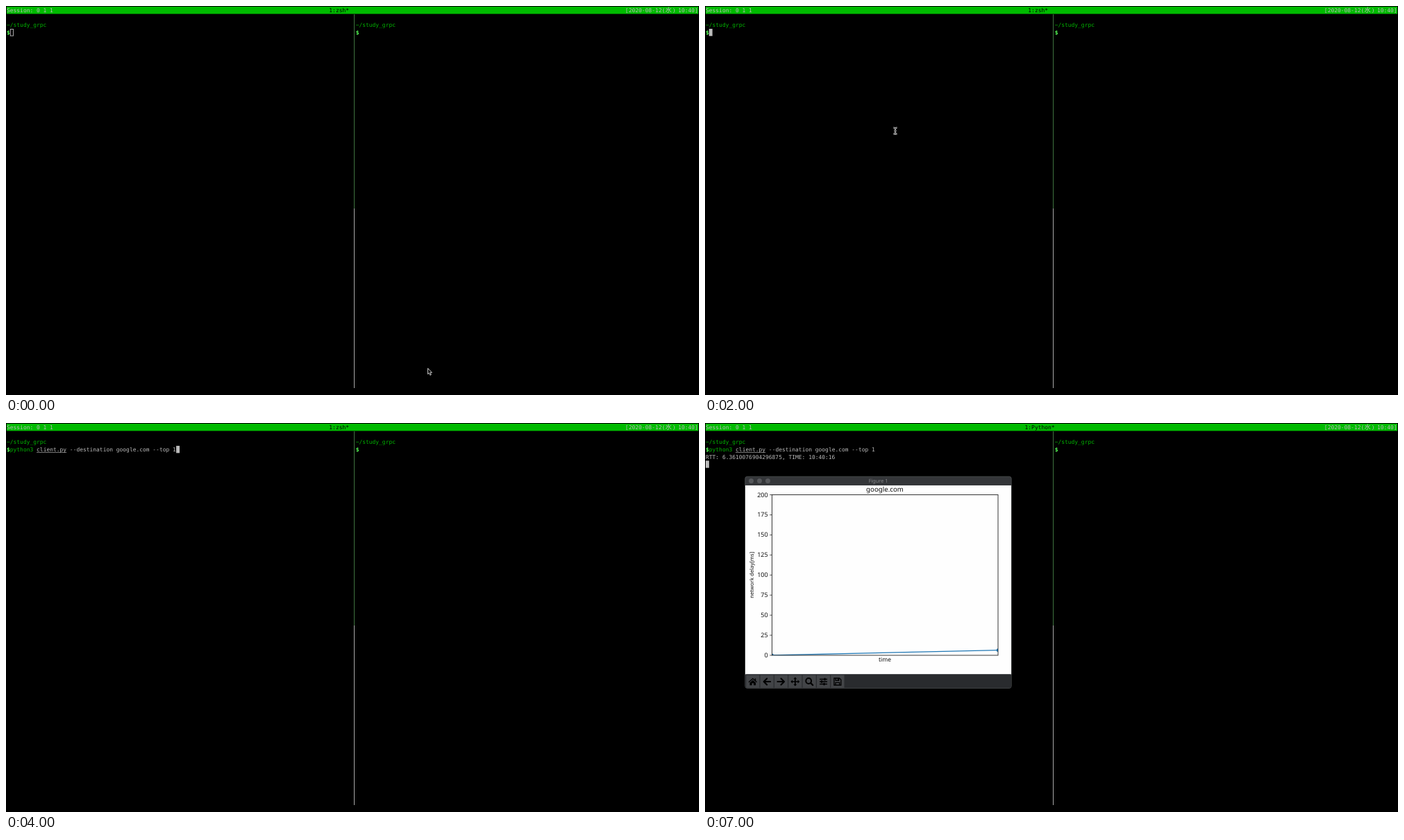
Animation of 998x561 px, one loop 8000 ms. Source, as an HTML page:

```html
<!DOCTYPE html>
<html lang="en">
<head>
<meta charset="utf-8">
<title>Terminal session</title>
<style>
  html, body { margin: 0; width: 100%; height: 100%; overflow: hidden; background: #000; }
  svg { display: block; width: 998px; height: 561px; }
  text { white-space: pre; text-rendering: geometricPrecision; }
  .term { font: 7.95px "DejaVu Sans Mono", monospace; fill: #bbb; }
  .term .green { fill: #00b400; }
  .term .prompt { fill: #5f5; font-weight: bold; }
  .term .hint { fill: #5c5c5c; }
  .term .dark { fill: #000; }
  .plot { font-family: "Noto Sans", "Open Sans", sans-serif; fill: #111; }
</style>
</head>
<body>
<svg id="stage" viewBox="0 0 998 561"></svg>
<script>
const CELL = 4.787, ROW = 10.7, LOOP = 8000;
const stage = document.getElementById('stage');

const colX = c => 1 + c * CELL;
const rowY = r => 6 + r * ROW;
const rect = (x, y, w, h, fill, more = '') =>
  `<rect x="${x}" y="${y}" width="${w}" height="${h}" fill="${fill}" ${more}/>`;
const path = (d, stroke, width, more = '') =>
  `<path d="${d}" fill="none" stroke="${stroke}" stroke-width="${width}" ${more}/>`;
const text = (col, row, s, cls = '') =>
  `<text class="${cls}" x="${colX(col)}" y="${rowY(row) + 2.7}">${s}</text>`;
const label = (x, y, size, s, more = '') =>
  `<text x="${x}" y="${y}" font-size="${size}" ${more}>${s}</text>`;

const block = (col, row) => rect(colX(col), rowY(row) - 5.2, 4.9, 10.4, '#bbb');
const hollow = (col, row) =>
  rect(colX(col) + .5, rowY(row) - 4.7, 4.2, 9.6, 'none', 'stroke="#bbb" stroke-width=".9"');

const arrow = (x, y) =>
  `<path d="M${x} ${y}v8.4l1.9-1.7 1.4 3.2 1.5-.7-1.4-3h2.5z" fill="#000" stroke="#ddd" stroke-width=".9"/>`;
function beam(x, y) {
  const d = `M${x - 2.6} ${y - 4.5}q2.6 0 2.6 1.5q0-1.5 2.6-1.5M${x} ${y - 3.5}v7` +
            `M${x - 2.6} ${y + 4.5}q2.6 0 2.6-1.5q0 1.5 2.6 1.5M${x - 1.5} ${y}h3`;
  return path(d, '#ddd', 2.2) + path(d, '#222', .7);
}

const args = ' --destination google.com --top 1';
const typing = text(1, 3, 'python', 'green') + block(7, 3) + text(7, 3, '3', 'dark') +
  text(8, 3, ' client.py' + args, 'hint');
const command = text(1, 3, 'python3', 'green') + text(9, 3, 'client.py' + args) +
  path(`M${colX(9)} 42.5h${9 * CELL}`, '#999', .8);

function base(title, col) {
  return rect(1, 1, 996, 10.4, '#00bb00') +
    text(0, 0, 'Session: 0 1 1') + text(col, 0, title, 'dark') +
    text(186.1, 0, '[2020-08-12(') +
    `<text x="949.6" y="9" style="font:9.2px 'Noto Sans CJK JP','Noto Sans CJK',sans-serif">水</text>` +
    text(200.3, 0, ')') + text(202, 0, '10:40]') +
    rect(501, 12, 1, 280, '#3f723f') + rect(501, 292, 1, 259, '#a8a8a8') +
    [0, 105].map(c => text(c, 2, '~/study_grpc', 'green') + text(c, 3, '$', 'prompt')).join('');
}

function toolbar() {
  const black = 'stroke-linecap="round" stroke-linejoin="round"';
  const icons = [
    '<path d="M-6.2.3L0-5.3 2.8-2.8v-1.8h1.6v3.2L6.2.3 5.4 1.2 0-3.6-5.4 1.2zM-4.3 1.5L0-2.3 4.3 1.5v3.7H1.2v-3h-2.4v3h-3.1z"/>',
    path('M5 0H-4.3M0-4.5L-4.5 0 0 4.5', '#000', 2.1, black),
    path('M-5 0H4.3M0-4.5L4.5 0 0 4.5', '#000', 2.1, black),
    path('M-5 0H5M0-5V5', '#000', 1.7) +
      [0, 90, 180, 270].map(a => `<path d="M6.5 0L3.8-2.5v5z" transform="rotate(${a})"/>`).join(''),
    '<circle cx="-1" cy="-1" r="3.9" fill="none" stroke="#000" stroke-width="2"/>' +
      path('M2 2L5 5', '#000', 2.4, black),
    path('M-5.5-3.5h11M-5.5 0h11M-5.5 3.5h11', '#000', 1.3) +
      path('M2-5.2v3.4M-2.5-1.7v3.4M1 1.8v3.4', '#000', 2.1),
    path('M-5-5H2.7L5-2.7V5H-5zM-2.7-5v3.4h4.5V-5M-2.9 5V1.3h5.8V5', '#000', 1.3) +
      rect(0, -4.5, 1.4, 2.3, '#000')
  ];
  return rect(58, 362.5, 383, 19.5, '#292b2e', 'rx="2"') +
    icons.map((icon, i) => {
      const x = 68.8 + i * 20.35;
      return rect(x - 9.6, 363.5, 19.2, 18.2, '#434548') +
        `<g transform="translate(${x} 373)" fill="#000">${icon}</g>`;
    }).join('');
}

function figure() {
  const left = 96.5, right = 422, top = 103.5, bottom = 335;
  const valueY = v => bottom - v * (bottom - top) / 200;
  const mid = 'text-anchor="middle"';
  let s = rect(57.8, 77.2, 383.4, 305.2, '#343639', 'rx="3" stroke="#55585a" stroke-width=".7"');
  for (const x of [66.5, 78.5, 90.5]) s += `<circle cx="${x}" cy="83.6" r="3.5" fill="#56585b"/>`;
  s += label(249.5, 86.3, 7.3, 'Figure 1', mid + ' fill="#85878a"');
  s += rect(58, 90, 383, 272.3, '#fefefe') + toolbar();
  s += label(259, 98.7, 9.7, 'google.com', mid);
  for (let v = 0; v <= 200; v += 25) {
    const y = valueY(v);
    s += path(`M93.3 ${y}H${left}`, '#222', .8) + label(90.6, y + 3, 9, v, 'text-anchor="end"');
  }
  s += label(259, 344.2, 8.5, 'time', mid);
  s += label(0, 0, 7.7, 'network delay[ms]', mid + ' transform="translate(70 219.3) rotate(-90)"');
  const end = valueY(6.361);
  s += `<clipPath id="axes">${rect(left, top, right - left, bottom - top, '#000')}</clipPath>` +
    `<g clip-path="url(#axes)" fill="#1f77b4">${path(`M${left} ${bottom}L${right} ${end}`, '#1f77b4', 1.3)}` +
    `<circle cx="${left}" cy="${bottom}" r="2.4"/><circle cx="${right}" cy="${end}" r="2.4"/></g>`;
  s += rect(left, top, right - left, bottom - top, 'none', 'stroke="#222" stroke-width=".9"');
  return `<g class="plot">${s}</g>`;
}

const shell = base('1:zsh*', 97);
const scenes = [
  [0, shell + hollow(1, 3) + arrow(607.5, 522.5)],
  [1000, shell + hollow(1, 3) + arrow(607.5, 527.5)],
  [2000, shell + block(1, 3) + beam(274, 180)],
  [3000, shell + typing],
  [4000, shell + command + block(51, 3)],
  [5000, shell + command + block(0, 4)],
  [7000, base('1:Python*', 96) + command +
    text(0, 4, 'RTT: 6.3610076904296875, TIME: 10:40:16') + block(0, 5) + figure()]
];

stage.innerHTML = scenes.map(([, art]) => `<g class="term" display="none">${art}</g>`).join('');
const layers = [...stage.children];
const start = performance.now();
let shown = -1;

function draw(now) {
  const t = Math.max(0, now - start) % LOOP;
  const next = scenes.filter(([at]) => at <= t).length - 1;
  if (next !== shown) {
    layers.forEach((g, i) => g.setAttribute('display', i === next ? 'inline' : 'none'));
    shown = next;
  }
  requestAnimationFrame(draw);
}
draw(start);
</script>
</body>
</html>
```
